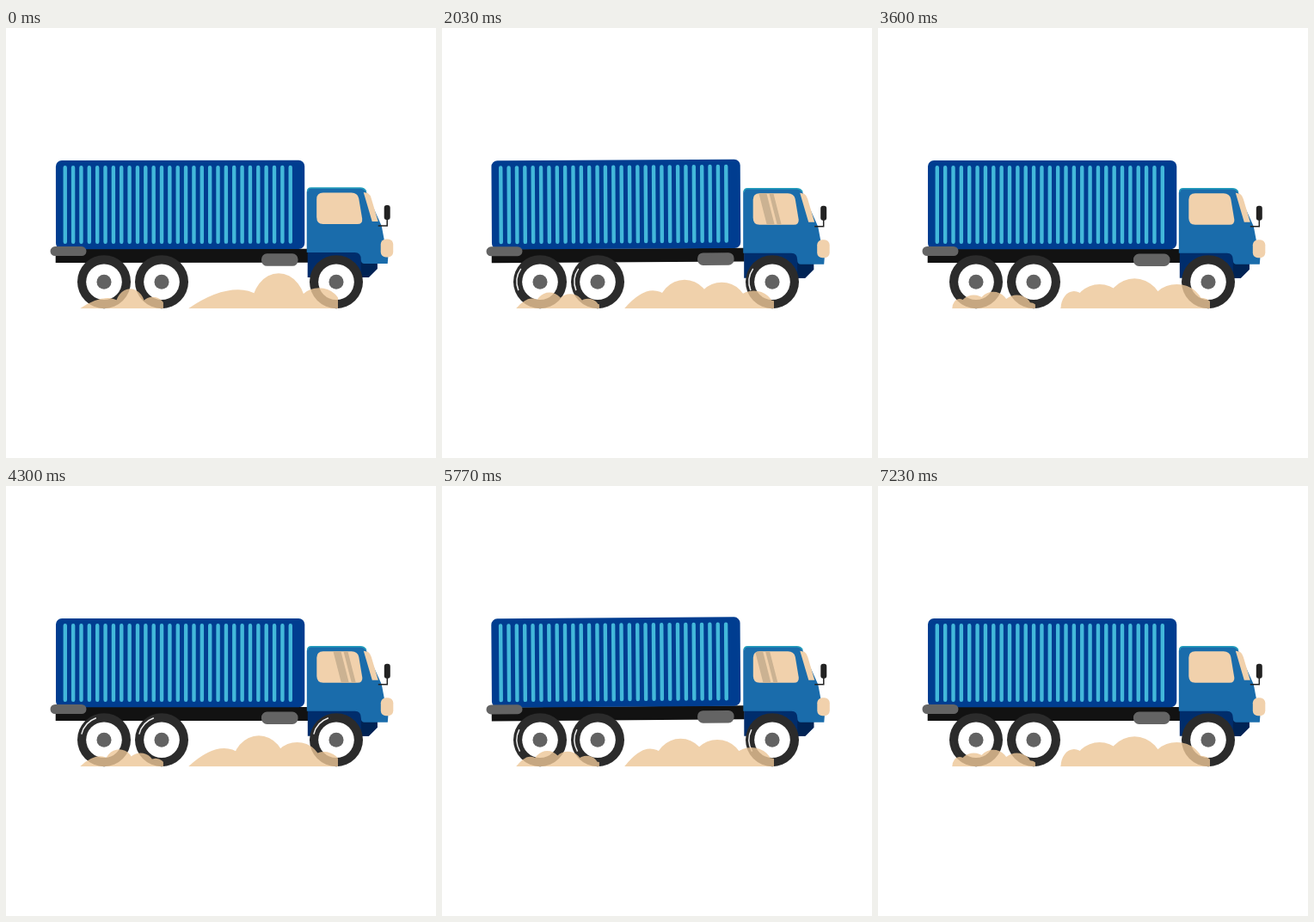
An HTML page with a canvas for the animation above (7260 ms loop, 500x500 px).

```html
<!DOCTYPE html>
<html lang="en">
<head>
<meta charset="utf-8">
<title>Truck</title>
<style>
html, body { margin: 0; width: 100%; height: 100%; overflow: hidden; background: #fff; }
canvas { display: block; width: 500px; height: 500px; }
</style>
</head>
<body>
<canvas id="stage" width="500" height="500"></canvas>
<script>
const ctx = document.getElementById('stage').getContext('2d');
const LOOP = 7260, CYCLE = LOOP / 6, TICK = LOOP / 218, STRIDE = 218 / 104;
const PEACH = '#f1d1ac', NAVY = '#003d90', BLUE = '#1a6cab', GREY = '#646464';
const RAD = Math.PI / 180;

const clamp = v => Math.max(0, Math.min(1, v));
const mix = (a, b, k) => a + (b - a) * k;
const smooth = k => (k = clamp(k)) * k * (3 - 2 * k);

// Bell-shaped pulse that wraps around the cycle
function pulse(p, center, width) {
  const d = Math.abs(p - center), gap = Math.min(d, CYCLE - d);
  return Math.exp(-((gap / width) ** 2));
}
const jolt = p => pulse(p, 65, 40);
const sway = p => pulse(p, 875, 110);

function box(x, y, w, h, r, fill) {
  ctx.fillStyle = fill;
  ctx.beginPath();
  ctx.roundRect(x, y, w, h, r);
  ctx.fill();
}

function disc(x, y, r, fill) {
  ctx.fillStyle = fill;
  ctx.beginPath();
  ctx.arc(x, y, r, 0, 2 * Math.PI);
  ctx.fill();
}

function fillPath(d, fill) {
  ctx.fillStyle = fill;
  ctx.fill(new Path2D(d));
}

function line(d, color, width) {
  ctx.strokeStyle = color;
  ctx.lineWidth = width;
  ctx.stroke(new Path2D(d));
}

function trailer(p) {
  ctx.save();
  ctx.translate(114, 258);
  ctx.rotate((-.75 * jolt(p) - .42 * sway(p)) * RAD);
  ctx.translate(-114, -258);
  box(57.7, 257, 294, 16, 0, '#121212');
  box(58, 154, 289.3, 103.3, 7, NAVY);
  for (let i = 0; i < 29; i++) box(66.6 + i * 9.357, 160, 4.4, 91, 2.2, '#43b8da');
  box(51.5, 254, 42, 11, 5.5, GREY);
  box(297, 262.5, 42.5, 14.5, 6.5, GREY);
  ctx.restore();
}

const PANE = 'M369 192.5H402Q409 192.5 410.5 199L414.5 223Q415 229 409 229H369Q361.5 229 361.5 221V200Q361.5 192.5 369 192.5Z';

function glint(p) {
  const x = 422 - .066 * p;
  ctx.save();
  ctx.clip(new Path2D(PANE));
  ctx.globalAlpha = clamp((1130 - p) / 100);
  fillPath(`M${x} 191h9l10 39h-9ZM${x + 12} 191h5l10 39h-5Z`, '#cbb292');
  ctx.restore();
}

function cab(p) {
  ctx.save();
  ctx.translate(.5 * sway(p) - 1.2 * jolt(p) - .2, -9 * jolt(p) - .3);
  fillPath('M351 258H432V281L422 291H351Z', '#002d6c');
  fillPath('M413 273H432V281L422 291H413Z', '#002354');
  fillPath('M350 262V192Q350 187 355 187H412Q417 187 419 191L437 231L440 247L445 262L444 275H417Q413 275 413 270Q413 262 406 262Z', BLUE);
  line('M351 191Q351 187 355 187H412Q417 187 419 191', '#249fbd', 1.5);
  fillPath(PANE, PEACH);
  glint(p);
  fillPath('M416 192L421 193Q424 195 425 199L433 226H426Z', PEACH);
  line('M443.5 222V231H433', '#222', 1.5);
  box(440, 207, 7, 17, 3, '#222');
  box(436, 246.5, 14.5, 21, 6, PEACH);
  ctx.restore();
}

function wheel(x, p) {
  const y = 295.2;
  disc(x, y, 31, '#2b2b2b');
  disc(x, y, 20.8, '#fff');
  disc(x, y, 8.5, '#626262');
  // The highlight swings from the right rim to the left one
  const angle = 55 - .12 * p - 130 * smooth((p - 480) / 190);
  ctx.save();
  ctx.globalAlpha = clamp(p / 60) * clamp((1150 - p) / 200);
  ctx.strokeStyle = '#eee';
  ctx.lineWidth = 1.5;
  ctx.beginPath();
  ctx.arc(x, y, 27, (angle - 28) * RAD, (angle + 28) * RAD);
  ctx.stroke();
  ctx.restore();
}

// Each puff drifts from one place and size to another
const PUFFS = [
  { x: [58, 12], w: [31, 14], h: [22, 20] },
  { x: [105, 40], w: [32, 30], h: [41, 27] },
  { x: [152, 80], w: [26, 34], h: [24, 36] },
  { x: [172, 132], w: [12, 33], h: [10, 30] },
  { x: [178, 162], w: [8, 15], h: [6, 13] }
];

function dust(x, scale, p) {
  const k = (p / CYCLE) ** 1.6;
  ctx.save();
  ctx.translate(x, 326.2);
  ctx.scale(scale, scale);
  ctx.beginPath();
  ctx.rect(0, -60, 174, 60);
  ctx.clip();
  ctx.beginPath();
  PUFFS.forEach((puff, i) => {
    const cx = mix(...puff.x, k), w = mix(...puff.w, k), h = mix(...puff.h, k);
    if (!i) {
      ctx.moveTo(0, 0);
      ctx.quadraticCurveTo(cx * .55, -h, cx, -h);
      ctx.lineTo(cx, 0);
      ctx.closePath();
    }
    ctx.moveTo(cx - w, 0);
    ctx.ellipse(cx, 0, w, h, 0, Math.PI, 2 * Math.PI);
    ctx.closePath();
  });
  ctx.fillStyle = 'rgba(237,198,151,.8)';
  ctx.fill();
  ctx.restore();
}

// Hold each pose for two or three ticks
function heldTime(ms) {
  const n = Math.floor((ms % LOOP) / TICK + .1);
  return Math.ceil(Math.floor(n / STRIDE) * STRIDE - 1e-6) * TICK;
}

function draw(now) {
  const p = heldTime(now) % CYCLE;
  ctx.fillStyle = '#fff';
  ctx.fillRect(0, 0, 500, 500);
  trailer(p);
  cab(p);
  for (const x of [114, 181, 384]) wheel(x, p);
  dust(86, .557, p);
  dust(212, 1, p);
}

const start = performance.now();
function loop() {
  draw(performance.now() - start);
  requestAnimationFrame(loop);
}
loop();
</script>
</body>
</html>
```
